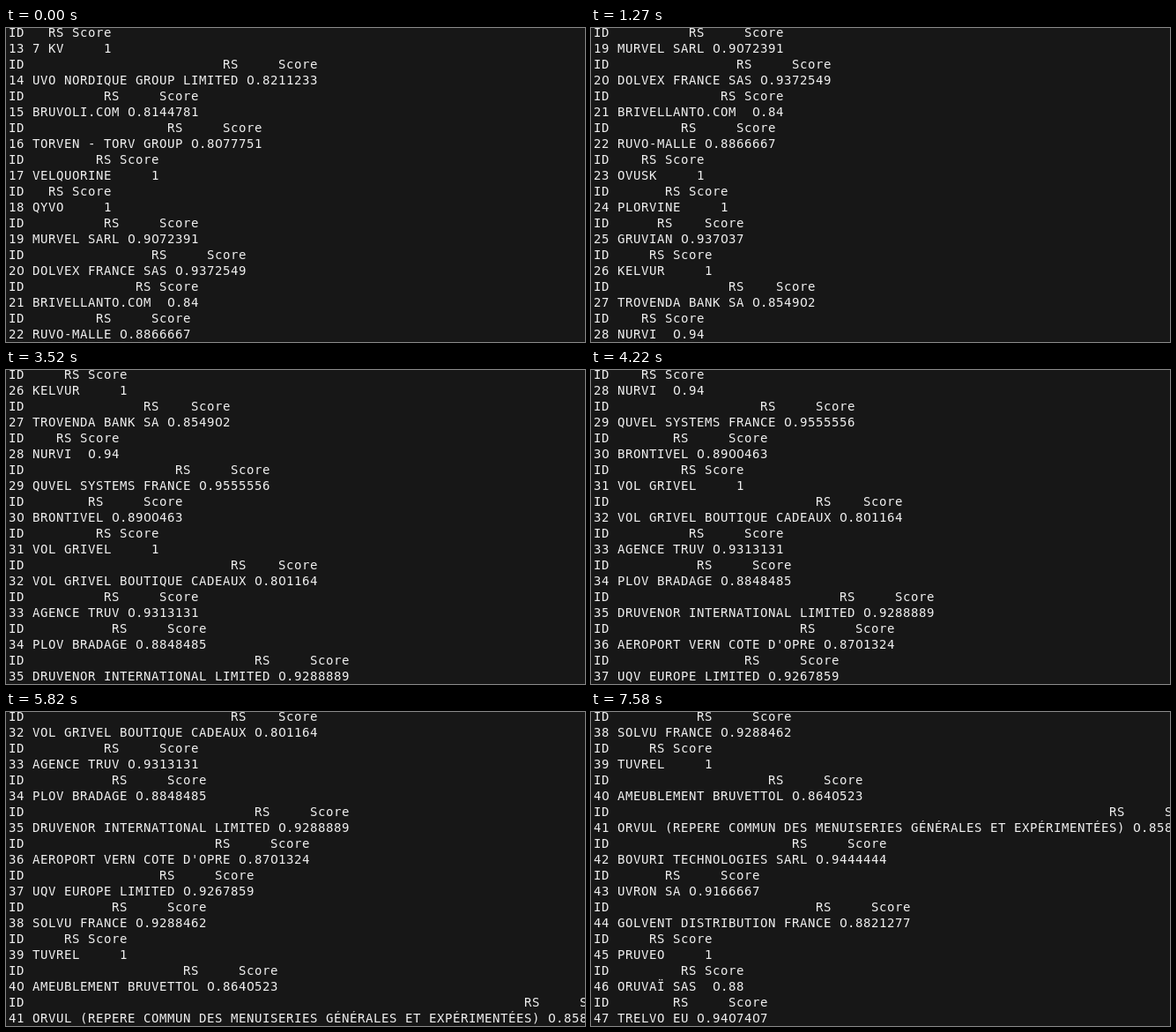
An HTML page for the animation above (8000 ms loop, 657 by 356 pixels).

```html
<!DOCTYPE html>
<html lang="fr">
<head>
<meta charset="utf-8">
<title>Scores</title>
<style>
html, body { margin: 0; width: 100%; height: 100%; overflow: hidden; background: #171717; }
pre {
  position: absolute; left: 3px; top: -4px; margin: 0;
  font: 14px/18px "DejaVu Sans Mono", monospace;
  color: #f0f0f0;
}
/* plain zero, without the dot */
b { font-family: "DejaVu Sans", sans-serif; font-weight: 400; }
/* every character sits on a 9px grid */
pre, b { letter-spacing: calc(9px - 1ch); }
</style>
</head>
<body>
<pre id="out"></pre>
<script>
const LOOP = 8000, FIRST_ID = 13, VISIBLE = 10;

// moments at which the console scrolls up by one record
const scrolls = [70, 180, 470, 630, 1010, 1270, 1650, 1960, 2130, 2590, 2820, 3140, 3520,
  3930, 4220, 4540, 4780, 5150, 5820, 6140, 6430, 6800, 7050, 7270, 7580];

const records = `7 KV|1
UVO NORDIQUE GROUP LIMITED|0.8211233
BRUVOLI.COM|0.8144781
TORVEN - TORV GROUP|0.8077751
VELQUORINE|1
QYVO|1
MURVEL SARL|0.9072391
DOLVEX FRANCE SAS|0.9372549
BRIVELLANTO.COM|0.84
RUVO-MALLE|0.8866667
OVUSK|1
PLORVINE|1
GRUVIAN|0.937037
KELVUR|1
TROVENDA BANK SA|0.854902
NURVI|0.94
QUVEL SYSTEMS FRANCE|0.9555556
BRONTIVEL|0.8900463
VOL GRIVEL|1
VOL GRIVEL BOUTIQUE CADEAUX|0.801164
AGENCE TRUV|0.9313131
PLOV BRADAGE|0.8848485
DRUVENOR INTERNATIONAL LIMITED|0.9288889
AEROPORT VERN COTE D'OPRE|0.8701324
UQV EUROPE LIMITED|0.9267859
SOLVU FRANCE|0.9288462
TUVREL|1
AMEUBLEMENT BRUVETTOL|0.8640523
ORVUL (REPERE COMMUN DES MENUISERIES GÉNÉRALES ET EXPÉRIMENTÉES)|0.8583333
BOVURI TECHNOLOGIES SARL|0.9444444
UVRON SA|0.9166667
GOLVENT DISTRIBUTION FRANCE|0.8821277
PRUVEO|1
ORUVAÏ SAS|0.88
TRELVO EU|0.9407407`.split("\n").map((row, i) => {
  const [name, score] = row.split("|");
  const width = Math.max(5, score.length) + 1;
  return "ID" + "RS".padStart(name.length + 1) + "Score".padStart(width) + "\n" +
    (FIRST_ID + i) + " " + name + score.padStart(width);
});

const out = document.getElementById("out");
let shown = -1;

function draw() {
  const t = performance.now() % LOOP;
  const top = scrolls.filter(s => s <= t).length;
  if (top !== shown) {
    shown = top;
    out.innerHTML = records.slice(top, top + VISIBLE).join("\n").replace(/0/g, "<b>0</b>");
  }
  requestAnimationFrame(draw);
}
draw();
</script>
</body>
</html>
```
